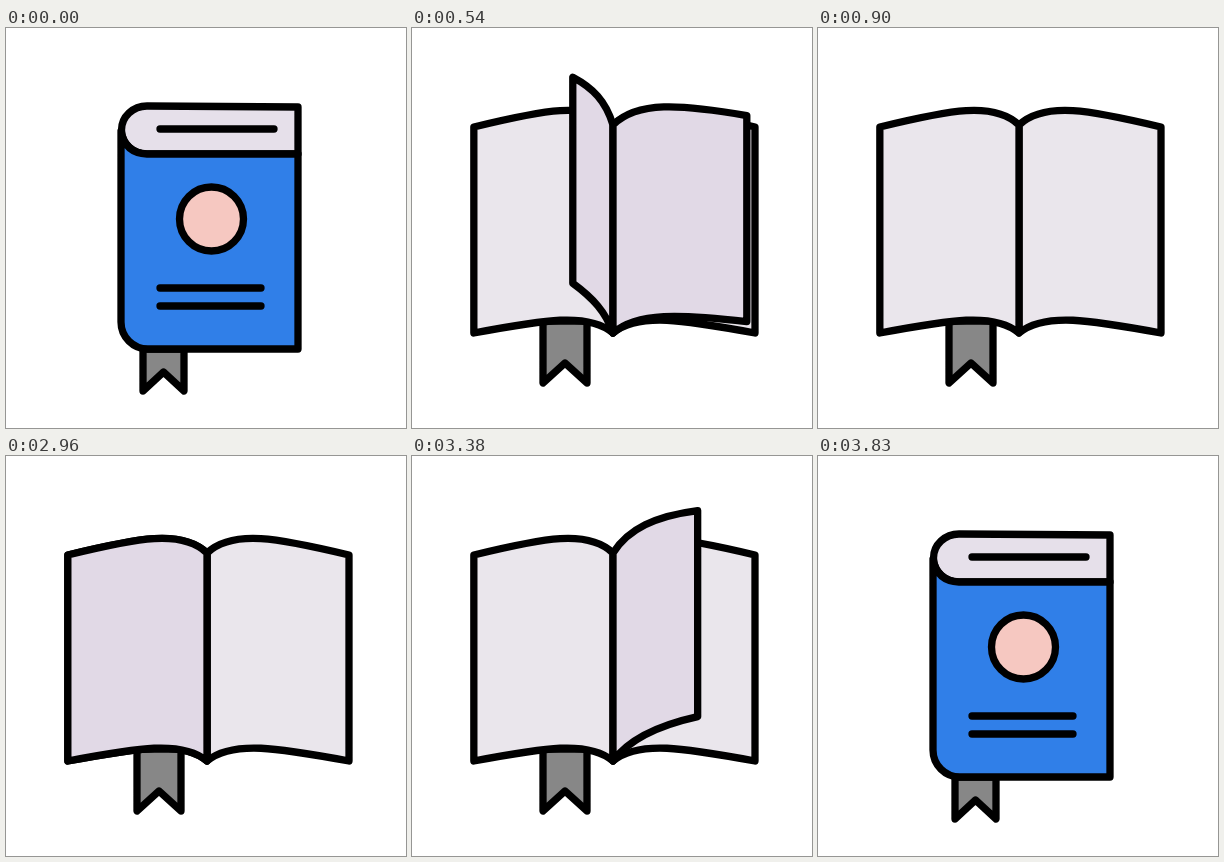
These frames come from a looping animation (400 by 400 pixels, 4360 ms). An HTML page:

```html
<!DOCTYPE html>
<html lang="en">
<head>
<meta charset="utf-8">
<title>Opening book</title>
<style>
  html, body { margin: 0; width: 100%; height: 100%; overflow: hidden; background: #fff; }
  svg { display: block; width: 100vw; height: 100vh; }
  path, circle { stroke: #000; stroke-width: 7.3; stroke-linecap: round; stroke-linejoin: round; vector-effect: non-scaling-stroke; }
  .paper { fill: #eae6ec; }
  .turning { fill: #e1d9e6; }
  .line { fill: none; }
</style>
</head>
<body>
<svg viewBox="0 0 400 400">
  <path id="ribbon" fill="#878787"/>
  <path id="right" class="paper"/>
  <path id="left" class="paper"/>
  <g id="sheets"></g>
  <g id="cover">
    <path fill="#e6e0ea" d="M292 79L141 78A25.5 24 0 0 0 141 126H292Z"/>
    <path fill="#307fe8" d="M115 103V294A27 27 0 0 0 142 321H292V126H141Q119 125 115 103Z"/>
    <path class="line" d="M154 101H268M154 260H255M154 278H255"/>
    <circle cx="205.5" cy="191" r="32" fill="#f6c8c1"/>
  </g>
</svg>
<script>
const LOOP = 4360, STEP = 30, STEPS = 30, CLOSE_AT = 2960;
const COVER_STEPS = 12.7, MOVE_STEPS = 12;

// Steps at which each sheet lifts off and disappears into the left stack.
const turns = [
  { start: 4.9, end: 15, speed: 17.8 },
  { start: 12, end: 22.1, speed: 17.8 },
  { start: 16.8, end: 30, speed: 16.3 }
];

const byId = id => document.getElementById(id);
const [ribbon, right, left, sheets, cover] = ['ribbon', 'right', 'left', 'sheets', 'cover'].map(byId);
const clamp = (v, lo, hi) => Math.min(hi, Math.max(lo, v));
const lerp = (a, b, p) => a + (b - a) * p;
const smooth = u => u * u * (3 - 2 * u);
const rad = deg => deg * Math.PI / 180;
const show = (el, on) => el.setAttribute('visibility', on ? 'visible' : 'hidden');

for (const turn of turns) {
  turn.el = document.createElementNS('http://www.w3.org/2000/svg', 'path');
  turn.el.setAttribute('class', 'turning');
  sheets.append(turn.el);
}

// A curved leaf hinged at x; a negative width reaches to the left.
function leaf(el, { x, width, top, height, bulge, lift = 0, cos = 1 }) {
  const at = (f, y) => `${(x + width * f).toFixed(2)} ${y.toFixed(2)}`;
  const spine = top - 2 * bulge;
  const near = top - 26 * bulge;
  const far = top - 17 * bulge - lift * (0.46 + 0.06 * cos);
  const edge = top - lift;
  el.setAttribute('d',
    `M${at(0, spine)}C${at(0.18, near)} ${at(0.5, far)} ${at(1, edge)}` +
    `L${at(1, edge + height)}` +
    `C${at(0.5, far + height + 4 * bulge)} ${at(0.18, near + height + 5 * bulge)} ${at(0, spine + height + 2 * bulge)}Z`);
}

function drawRibbon(x, cos, p) {
  const swing = cos * Math.abs(cos);
  const a = x + swing * lerp(22, 26, p);
  const b = x + swing * lerp(63, 70, p);
  const top = lerp(321, 293, p), bottom = lerp(363, 355, p), notch = lerp(344, 335, p);
  ribbon.setAttribute('d', `M${a} ${top}V${bottom}L${(a + b) / 2} ${notch}L${b} ${bottom}V${top}Z`);
}

function draw(step) {
  const p = smooth(clamp(step / MOVE_STEPS, 0, 1));
  const coverCos = Math.cos(rad(180 * clamp(step / COVER_STEPS, 0, 1)));
  const x = lerp(115, 201, p);
  const width = lerp(177, 142, p);
  const top = lerp(79, 99, p);
  const height = lerp(242, 206, p);

  drawRibbon(x, coverCos, p);

  const inset = 24 * (1 - p) ** 2;
  leaf(right, { x: x + inset, width: width - inset, top, height, bulge: p });
  show(right, step > 0);

  leaf(left, {
    x, width: width * coverCos * 0.98,
    top: lerp(130, 99, p), height: lerp(200, 206, p), bulge: p
  });
  show(left, coverCos < 0);

  const squeeze = height / 242;
  const sx = coverCos * width / 177;
  cover.setAttribute('transform', `matrix(${sx} 0 0 ${squeeze} ${x - 115 * sx} ${top - 79 * squeeze})`);
  show(cover, coverCos >= 0);

  for (const { el, start, end, speed } of turns) {
    const angle = rad(clamp((step - start) * speed, 0, 180));
    const cos = Math.cos(angle);
    const lift = 55 * (1 + 0.18 * cos) * Math.max(0, Math.sin(angle)) ** (1.2 + 0.4 * cos);
    leaf(el, { x, width: width * cos * (cos < 0 ? 0.98 : 1), top, height, bulge: p, lift, cos });
    show(el, step > start && step < end);
  }
}

function stepAt(t) {
  return t < CLOSE_AT
    ? Math.min(STEPS, Math.floor(t / STEP))
    : Math.max(0, STEPS - 1 - Math.floor((t - CLOSE_AT) / STEP));
}

const began = performance.now();
function tick() {
  draw(stepAt((performance.now() - began) % LOOP));
  requestAnimationFrame(tick);
}
tick();
</script>
</body>
</html>
```
